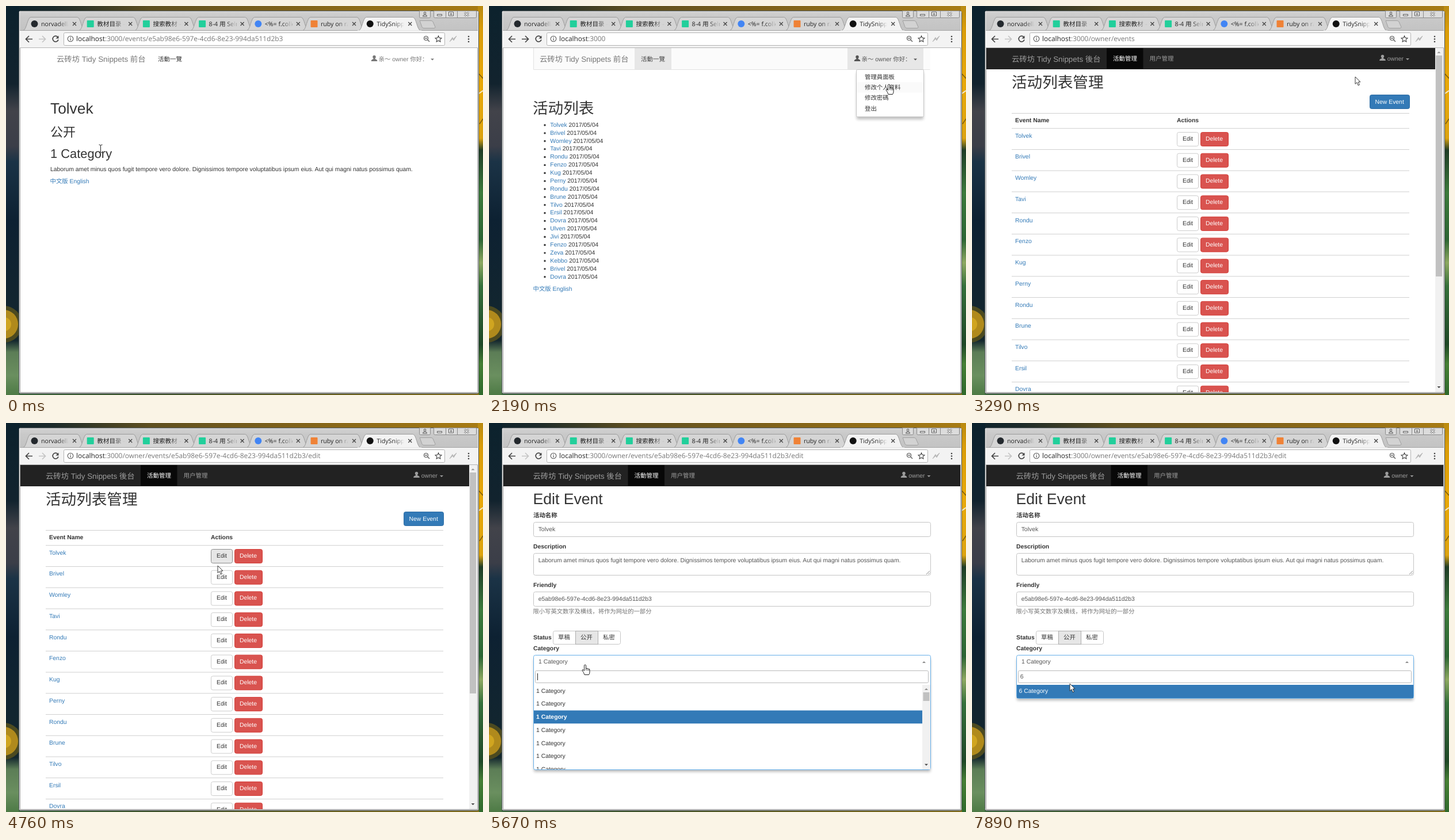
An HTML page that plays this animation: 829 px wide and 676 px high, repeating every 8 s.

```html
<!DOCTYPE html>
<html lang="zh-CN">
<head>
<meta charset="utf-8">
<style>
html, body { margin: 0; width: 100%; height: 100%; overflow: hidden; background: #0d202b; }
svg { display: block; }
text { font-family: "Liberation Sans", "Noto Sans CJK SC", "Noto Sans CJK", sans-serif; white-space: pre; text-rendering: geometricPrecision; }
.ui { font-family: "Open Sans", "Noto Sans", "Noto Sans CJK SC", "Noto Sans CJK", sans-serif; }
</style>
</head>
<body>
<svg id="stage" width="829" height="676" viewBox="0 0 829 676"></svg>
<script>
const LOOP = 8000, STEP = 183.3, LEAD = 17;
const BODY = 10.38, H1 = 26.6;
const LINK = '#337ab7', INK = '#333';
const ID = 'e5ab98e6-597e-4cd6-8e23-994da511d2b3';
const names = ['Tolvek', 'Brivel', 'Womley', 'Tavi', 'Rondu', 'Fenzo', 'Kug', 'Perny', 'Rondu', 'Brune',
  'Tilvo', 'Ersil', 'Dovra', 'Ulven', 'Jivi', 'Fenzo', 'Zeva', 'Kebbo', 'Brivel', 'Dovra'];
const lorem = 'Laborum amet minus quos fugit tempore vero dolore. Dignissimos tempore voluptatibus ipsum eius. Aut qui magni natus possimus quam.';

const text = (x, y, s, fill = INK, size = BODY, more = '') =>
  `<text x="${x}" y="${y}" fill="${fill}" font-size="${size}" ${more}>${s}</text>`;
const bold = (x, y, s, fill = INK) => text(x, y, s, fill, BODY, 'font-weight="700"');
const mid = (x, y, s, fill = INK) => text(x, y, s, fill, BODY, 'text-anchor="middle"');
const rect = (x, y, w, h, fill, more = '') =>
  `<rect x="${x}" y="${y}" width="${w}" height="${h}" fill="${fill}" ${more}/>`;
const box = (x, y, w, h, fill, stroke, r = 3) =>
  rect(x + .5, y + .5, w - 1, h - 1, fill, `rx="${r}" stroke="${stroke}"`);
const path = (d, stroke, w = 1, fill = 'none', more = '') =>
  `<path d="${d}" stroke="${stroke}" stroke-width="${w}" fill="${fill}" ${more}/>`;
const dot = (x, y, r, fill) => `<circle cx="${x}" cy="${y}" r="${r}" fill="${fill}"/>`;
const group = (id, inner, more = '') => `<g id="${id}" ${more}>${inner}</g>`;
const tri = (x, y, dir, fill, s = 3) => path(`M${x - s},${y}h${2 * s}l${-s},${dir * s}z`, 'none', 0, fill);
const grad = (id, stops, dir = 'x2="0" y2="1"') =>
  `<linearGradient id="${id}" ${dir}>${stops.map(([o, c, a = 1]) =>
    `<stop offset="${o}" stop-color="${c}" stop-opacity="${a}"/>`).join('')}</linearGradient>`;
const person = (x, y, fill) => dot(x, y - 2.6, 2.7, fill) +
  path(`M${x - 5.2},${y + 5}v-1.5q1,-2 3.7,-2.6v-2h3v2q2.7,.6 3.7,2.6v1.5z`, 'none', 0, fill);

function defs() {
  return '<defs>' +
    grad('left', [[0, '#0c222d'], [.2, '#12232e'], [.27, '#42434a'], [.36, '#3b3e48'], [.4, '#1b3346'],
      [.55, '#0d2132'], [.86, '#14272e'], [.89, '#5c7d56'], [.95, '#6a8f5f'], [1, '#4d7a45']]) +
    grad('right', [[0, '#b98a12'], [.06, '#d99c08'], [.2, '#e8a808'], [.34, '#dca310'], [.37, '#1f3c26'],
      [.48, '#3c7a3b'], [.6, '#2c6533'], [.66, '#8da860'], [.72, '#35703a'], [.87, '#1f4726'], [.92, '#467f34'], [1, '#2f692c']]) +
    grad('top', [[0, '#0d222c'], [.1, '#1c2a2a'], [.3, '#5e4f20'], [.6, '#80621a'], [1, '#a87c14']], '') +
    grad('bottom', [[0, '#3f6a40'], [.3, '#42562f'], [.7, '#6f6522'], [1, '#86701f']], '') +
    grad('bar', [[0, '#d2d2d2'], [.3, '#c9c9c9'], [1, '#c3c3c3']]) +
    grad('fade0', [[0, '#d5d5d5', 0], [1, '#d5d5d5']], '') +
    grad('fade1', [[0, '#f3f3f3', 0], [1, '#f3f3f3']], '') +
    '<filter id="soft" x="-10%" y="-10%" width="120%" height="130%"><feGaussianBlur stdDeviation="2.5"/></filter>' +
    '<clipPath id="view"><rect x="25" y="73" width="794" height="598"/></clipPath>' +
    '<clipPath id="opts"><rect x="78" y="453" width="689" height="149"/></clipPath></defs>';
}

function wallpaper() {
  return rect(0, 0, 829, 9, 'url(#top)') + rect(0, 0, 23, 676, 'url(#left)') + rect(820, 0, 9, 676, 'url(#right)') +
    dot(-4, 553, 32, '#4c4a20') + dot(-4, 553, 25, '#b08a1c') + dot(-3, 553, 12, '#d0a520') +
    path('M822,152l7,-5', '#f3ead0', 2) + path('M822,118l7,8M823,205l6,-9', '#7b5a0c', 1.5) +
    rect(22, 672, 800, 4, 'url(#bottom)');
}

function tab(i, title, color, round) {
  const x = 31 + 97.2 * i, on = i === 6, tone = on ? '#f3f3f3' : '#d5d5d5';
  const icon = round ? dot(x + 18.5, 31, 6, color) : rect(x + 12.5, 25, 12, 12, color, 'rx="1"');
  return path(`M${x - 1},42.5C${x + 5},41 ${x + 6},20 ${x + 12},19.5H${x + 93}C${x + 99},20 ${x + 100},41 ${x + 106},42.5`, '#9c9c9c', 1, tone) +
    icon + `<svg x="${x + 30}" y="20" width="48" height="21">` +
    text(0, 14.5, title, '#222', 10.6, 'class="ui"') + rect(30, 0, 18, 21, `url(#fade${+on})`) + '</svg>' +
    path(`M${x + 85},28l6,6m0,-6l-6,6`, '#444', 1.3);
}

function chrome() {
  const tabs = [
    ['norvadell/', '#24292e', 1], ['教材目录 - ', '#22cf9b'], ['搜索教材 - ', '#22cf9b'], ['8-4 用 Select', '#22cf9b'],
    ['&lt;%= f.collec', '#4285f4', 1], ['ruby on rails', '#ef8236'], ['TidySnippets', '#111', 1]];
  const cross = 'M797,11l7,6.5m0,-6.5l-7,6.5';
  return box(22, 8, 800, 666, '#d0d0d0', '#4d5558', 3) + rect(23, 9, 798, 34, 'url(#bar)') +
    path('M23.5,10V672M820.5,10V672', '#f0f0f0') +
    tabs.map((t, i) => tab(i, ...t)).join('') +
    path('M719,25.5h20q2,0 3,2l4,9q0,2 -2,2h-18q-2,0 -3,-2z', '#a0a0a0', 1, '#d2d2d2') +
    path('M718.5,8.5h19v10q0,2 -2,2h-15q-2,0 -2,-2zM743.5,8.5h74v10q0,2 -2,2h-70q-2,0 -2,-2zM764.5,8.5v12M784.5,8.5v12', '#8b8b8b', 1, '#dcdcdc') +
    path('M749.5,14.5h8v2.5h-8zM769.5,10.5h8v6.5h-8zM772,13h3v2h-3z', '#555', 1, '#fff') +
    path(cross, '#555', 2.6) + path(cross, '#fff', 1.1) +
    '<circle cx="728" cy="12.3" r="1.8" fill="none" stroke="#555"/>' + path('M724.5,18q0,-3 3.5,-3t3.5,3z', '#555') +
    rect(24, 42.5, 796, 30, '#f3f3f3') + path('M24,42.5H611M722,42.5H820', '#a6a6a6') + path('M24,72.5H820', '#b4b4b4') +
    rect(25, 73, 794, 598, '#fff') + path('M24.5,73V671.5H819.5V73', '#9a9a9a') +
    group('backHover', rect(27, 45, 26, 25, '#dcdcdc', 'rx="2"')) +
    path('M46,57.5H35M40,52l-5.5,5.5l5.5,5.5', '#444', 1.7) +
    path('M57,57.5H68M63,52l5.5,5.5l-5.5,5.5', '#c4c4c4', 1.7, 'none', 'id="forward"') +
    path('M90.3,54.2A5,5 0 1 0 91,58.5', '#444', 1.7) + path('M91.5,51.5v5h-5z', 'none', 0, '#444') +
    box(100, 46, 663, 23, '#fff', '#b3b3b3', 2) +
    '<circle cx="112" cy="57" r="4.8" fill="none" stroke="#555" stroke-width="1.1"/>' + path('M112,56.2v3.5M112,54v1.2', '#555', 1.2) +
    text(122, 61.3, '', '#777', 11.93, 'class="ui" id="url"') +
    '<circle cx="730" cy="56" r="3.5" fill="none" stroke="#555" stroke-width="1.2"/>' + path('M732.5,58.5l3.5,3.5M728.3,56h3.4', '#555', 1.3) +
    path('M751.5,51.8l1.6,3.6l3.9,.4l-2.9,2.6l.8,3.8l-3.4,-2l-3.4,2l.8,-3.8l-2.9,-2.6l3.9,-.4z', '#444', 1.1) +
    path('M771,62l5,-7.5l1,3l6,-5.5l-5,8l-1.5,-3z', '#b0b0b0', .8, '#b8b8b8') +
    [53, 57.5, 62].map(y => dot(804, y, 1.3, '#444')).join('');
}

function siteNav(active) {
  return (active ? rect(77, 73, 690, 37, '#fbfbfb') + path('M77.5,73V110.5H766.5', '#e2e2e2') +
      rect(253, 73, 64, 37, '#e7e7e7') : '') +
    text(88, 97, '云砖坊 Tidy Snippets 前台', '#777', 13.35) +
    text(264, 95.5, '活動一覽', active ? '#444' : INK, 10.5);
}
const account = fill => person(640, 91, fill) + text(647.5, 95.5, '亲～ owner 你好：', fill) + tri(741, 91.5, 1, fill);
const langs = y => text(76.5, y, '中文版 English', LINK);

function eventPage() {
  return siteNav(false) + account('#777') + text(77, 187, names[0], INK, 26.3) + text(77, 227, '公开', INK, 22) +
    text(77, 264, '1 Category', INK, 21.9) + text(77, 286.5, lorem) + langs(307.7);
}

function listPage() {
  const items = names.map((n, i) => {
    const y = 206 + 13.88 * i;
    return dot(97, y + 1, 1.7, INK) + text(106.3, y + 3.8, `<tspan fill="${LINK}">${n}</tspan> 2017/05/04`);
  }).join('');
  const menu = ['管理員面板', '修改个人資料', '修改密碼', '登出'];
  return siteNav(true) + group('userIdle', account('#777')) + group('userHover', account(INK)) +
    text(76, 187, '活动列表', INK, H1) + items + langs(494.7) +
    group('menu', rect(623, 73, 132, 37, '#e7e7e7') + account('#555') +
      rect(639, 116, 116, 81, '#000', 'opacity=".25" filter="url(#soft)"') + box(638, 110, 118, 83, '#fff', '#c6c6c6', 2) +
      rect(639, 0, 116, 18.2, '#fafafa', 'id="menuHover"') +
      menu.map((s, i) => text(653, 127 + 18.2 * i, s)).join(''));
}

function adminNav(x, right) {
  return rect(25, 73, right - 25, 37, '#222') + rect(x + 165, 73, 63.5, 36, '#080808') +
    text(x, 96.5, '云砖坊 Tidy Snippets 後台', '#9d9d9d', 13.35) + text(x + 176, 94.5, '活動管理', '#fff', 10.5, 'font-weight="500"') +
    text(x + 239.5, 94.5, '用户管理', '#9d9d9d', 10.5) + person(x + 644.5, 90, '#9d9d9d') +
    text(x + 652.7, 94.5, 'owner', '#9d9d9d') + tri(x + 688, 91, 1, '#9d9d9d');
}

function tablePage() {
  const rows = names.slice(0, 13).map((n, i) => {
    const y = 212.7 + 36.73 * i;
    return path(`M69,${y}H760`, '#cfcfcf') + text(75, y + 16, n, LINK) +
      rect(356.5, y + 6.8, 37, 24, '#fff', `rx="3" stroke="#ccc" ${i ? '' : 'id="edit"'}`) + mid(375, y + 21.3, 'Edit') +
      rect(397.5, y + 6.8, 48, 24, '#d9534f', 'rx="3" stroke="#d43f3a"') + mid(421, y + 21.3, 'Delete', '#fff');
  }).join('');
  return adminNav(69, 805) + text(69, 141.5, '活动列表管理', INK, H1) +
    box(691, 154, 70, 25, LINK, '#2e6da4') + mid(725.7, 169.7, 'New Event', '#fff') +
    path('M69,186.5H760', '#cfcfcf') + bold(75, 202.3, 'Event Name') + bold(356, 202.3, 'Actions') + rows +
    rect(805, 73, 13.5, 598, '#f1f1f1') + rect(806, 86, 11, 384, '#c1c1c1') + tri(811.5, 82, -1, '#999') + tri(811.5, 661, 1, '#444');
}

function formPage() {
  const field = (y, h, s) => box(77, y, 691, h, '#fff', '#c4c4c4') + text(85.7, y + 15.7, s, '#555');
  const states = ['草稿', '公开', '私密'];
  const panel = h => rect(78, 410, 689, h - 4, '#000', 'opacity=".28" filter="url(#soft)"') +
    box(77, 403, 691, h, '#fff', '#66afe9') + tri(756, 417, -1, '#888') + box(80, 430, 684, 22, '#fff', '#bbb', 2);
  const opts = Array.from({ length: 7 }, (_, i) => {
    const y = 454 + 22.75 * i, picked = i === 2;
    return (picked ? rect(78, y, 675, 22.75, LINK) : '') +
      (picked ? bold : text)(82, y + 14.7, '1 Category', picked ? '#fff' : INK);
  }).join('');
  return adminNav(76.5, 819) + text(76.5, 141, 'Edit Event', INK, H1) +
    bold(77, 164, '活动名称') + field(172, 26, names[0]) +
    bold(77, 218, 'Description') + field(226, 39, lorem) + path('M760,263l6,-6M763.5,263l2.5,-2.5', '#888') +
    bold(77, 285, 'Friendly') + field(293, 26, ID) +
    text(76.5, 331.3, '限小写英文数字及横线，将作为网址的一部分', '#737373', 10.3) + bold(77, 375.8, 'Status') +
    box(111, 361, 118, 24, '#fff', '#c6c6c6') + box(150, 361, 40, 24, '#e6e6e6', '#adadad', 0) +
    states.map((s, i) => mid(130.5 + 39 * i, 375.5, s)).join('') + bold(77, 395.3, 'Category') +
    group('closed', box(77, 403, 691, 26, '#fff', '#c4c4c4') + tri(756, 414.5, 1, '#888')) +
    group('open', panel(200) + group('options', opts, 'clip-path="url(#opts)"') + rect(753, 455, 14, 147, '#f1f1f1') +
      rect(754.5, 468, 11, 15, '#c1c1c1') + tri(760, 464, -1, '#888') + tri(760, 592.5, 1, '#444') +
      group('caret', rect(84, 435, 1, 12, '#222'))) +
    group('found', panel(76) + text(83.7, 444.2, '6', '#555') + rect(78, 455, 689, 23, LINK) + text(81.5, 468.7, '6 Category', '#fff')) +
    text(86, 418, '1 Category', '#555');
}

function pointers() {
  return group('beam', path('M-3,-7Q0,-7 0,-5V5Q0,7 -3,7M3,-7Q0,-7 0,-5M0,5Q0,7 3,7', '#222')) +
    group('arrow', path('M0,0V12.5L3,9.8L5.2,15L7.4,14L5.2,9H9Z', '#222', .9, '#fff')) +
    group('hand', path('M-1.5,1Q0,-1 1.5,1V7Q3,5.5 4,7Q5.5,6 6.3,7.5Q8,7 8,9V13Q8,15 6.5,17.5H-1Q-2.5,13 -5,10Q-4.8,7.5 -2.8,9.3L-1.5,10.5Z', '#222', 1, '#fff') +
      path('M1.5,7v3M4,7.5v3M6.3,8v2.5', '#222', .8));
}

document.getElementById('stage').innerHTML = defs() + wallpaper() + chrome() +
  group('pages', group('event', eventPage()) + group('list', listPage()) + group('table', tablePage()) +
    group('form', formPage()), 'clip-path="url(#view)"') + group('pointer', pointers());

const el = id => document.getElementById(id);
const show = (id, on) => el(id).setAttribute('display', on ? 'inline' : 'none');

// step, x, y, pointer shape
const track = [
  [0, 164.5, 248, 'beam'], [1, 130, 190, 'arrow'], [3, 39, 57, 'arrow'], [4, 39, 57, 'arrow'], [6, 690, 97, 'hand'],
  [7, 699, 105, 'hand'], [9, 699, 100, 'hand'], [12, 695, 136, 'hand'], [15, 688, 121, 'hand'], [17, 688, 121, 'arrow'],
  [18, 666, 123, 'arrow'], [22, 373, 228, 'hand'], [24, 371, 231, 'hand'], [25, 368, 246, 'arrow'], [26, 368, 248, 'arrow'],
  [28, 225, 375, 'arrow'], [30, 170, 416, 'hand'], [31, 167, 420, 'hand'], [34, 167, 420, 'hand'], [35, 168, 422, 'hand'],
  [40, 168, 422, 'hand'], [42, 170, 450, 'arrow'], [43, 170, 453, 'arrow'], [44, 170, 453, 'arrow']];

function pointerAt(k) {
  const i = track.findIndex((p, j) => track[j + 1][0] > k);
  const [a, x, y, shape] = track[i], [b, x2, y2] = track[i + 1];
  const f = (k - a) / (b - a);
  return { x: x + (x2 - x) * f, y: y + (y2 - y) * f, shape };
}

function render(ms) {
  const k = Math.min(43, Math.floor((ms % LOOP + LEAD) / STEP));
  const page = k < 4 ? 'event' : k < 17 ? 'list' : k < 27 ? 'table' : 'form';
  const route = k < 4 ? '/events/' + ID : k < 17 ? '' : k < 24 ? '/owner/events' : `/owner/events/${ID}/edit`;
  const p = pointerAt(k);
  ['event', 'list', 'table', 'form'].forEach(id => show(id, id === page));
  el('url').innerHTML = `<tspan fill="#222">localhost</tspan>:3000${route}`;
  el('forward').setAttribute('stroke', page === 'list' ? '#444' : '#c4c4c4');
  show('backHover', k === 3 || k === 4);

  const menuOpen = k >= 9;
  const overUser = k >= 6 && !menuOpen;
  const row = Math.floor((p.y - 114) / 18.2);
  show('userIdle', !overUser && !menuOpen);
  show('userHover', overUser);
  show('menu', menuOpen);
  show('menuHover', row >= 0 && row < 4);
  el('menuHover').setAttribute('y', 114 + 18.2 * row);

  el('edit').setAttribute('fill', k >= 22 ? '#e6e6e6' : '#fff');
  el('edit').setAttribute('stroke', k >= 23 ? '#8c8c8c' : k === 22 ? '#adadad' : '#ccc');

  show('closed', k < 31);
  show('open', k >= 31 && k < 41);
  show('found', k >= 41);
  show('caret', Math.floor((k - 31) / 3) % 2 === 0);

  ['beam', 'arrow', 'hand'].forEach(id => show(id, id === p.shape));
  el('pointer').setAttribute('transform', `translate(${p.x} ${p.y})`);
}

const start = performance.now();
function tick() {
  render(performance.now() - start);
  requestAnimationFrame(tick);
}
tick();
</script>
</body>
</html>
```
